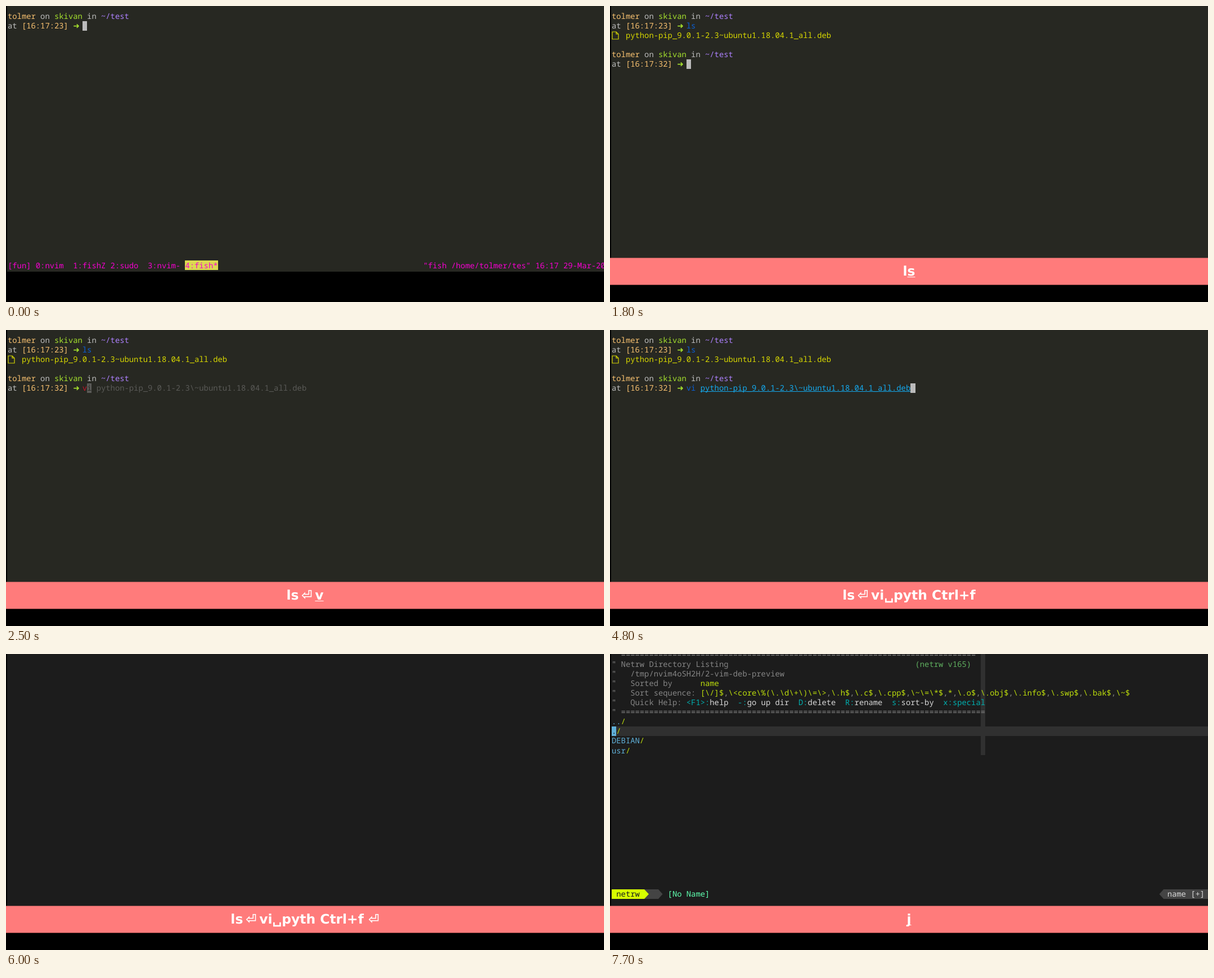
An HTML page with a canvas that plays this animation: 1063x527 px, repeating every 8000 ms.

```html
<!DOCTYPE html>
<html lang="en">
<head>
<meta charset="utf-8">
<title>Terminal session</title>
<style>
html, body { margin: 0; width: 100%; height: 100%; overflow: hidden; background: #000; }
canvas { display: block; }
</style>
</head>
<body>
<canvas id="stage" width="1063" height="527"></canvas>
<script>
const ctx = document.getElementById('stage').getContext('2d');
const W = 1063, LOOP = 8000;
const LEFT = 3, TOP = 9.7, CW = 8.3, CH = 17.06;
const MONO = "500 13.83px 'Noto Sans Mono', 'DejaVu Sans', monospace";
const BOLD = "bold 23.4px 'DejaVu Sans', sans-serif";
const USER = 'tolmer', HOST = 'skivan';
const FILE = 'python-pip_9.0.1-2.3~ubuntu1.18.04.1_all.deb';
const PATH = FILE.replace('~', '\\~');

const GREY = '#bdbdbd', ORANGE = '#f8c170', LIME = '#a6e22e', PURPLE = '#ae81ff',
  BLUE = '#0a5fd7', CYAN = '#14a9ee', YELLOW = '#d7d700', HINT = '#5a5a57',
  RED = '#c4152c', PINK = '#f500d0', SHELL = '#272822',
  EDITOR = '#1c1c1c', STRIPE = '#303030', DIM = '#858585', GREEN = '#5faf5f',
  ACID = '#bcdc0c', TEAL = '#00afaf', WHITE = '#d8d8d8', DIR = '#5fafd7';

const colX = c => LEFT + c * CW;
const rowY = r => TOP + r * CH;

function rect(x, y, w, h, color) {
  ctx.fillStyle = color;
  ctx.fillRect(x, y, w, h);
}

function cells(col, row, n, color) {
  const x = Math.round(colX(col)), y = Math.round(rowY(row));
  rect(x, y, Math.round(colX(col + n)) - x, Math.round(rowY(row + 1)) - y, color);
}

function shape(color, ...p) {
  ctx.fillStyle = color;
  ctx.beginPath();
  for (let i = 0; i < p.length; i += 2) ctx.lineTo(p[i], p[i + 1]);
  ctx.fill();
}

// Writes colour/text pairs on the character grid, returns the next column.
function put(col, row, ...runs) {
  ctx.font = MONO;
  for (let i = 0; i < runs.length; i += 2) {
    ctx.fillStyle = runs[i];
    for (const ch of runs[i + 1]) {
      if (ch !== ' ') ctx.fillText(ch, colX(col), rowY(row) + 13.3);
      col++;
    }
  }
  return col;
}

function cursor(col, row, under = '') {
  cells(col, row, 1, under ? HINT : '#bbbbbb');
  put(col, row, SHELL, under);
}

function prompt(row, clock) {
  put(0, row, ORANGE, USER, GREY, ' on ', LIME, HOST, GREY, ' in ', PURPLE, '~/test');
  put(0, row + 1, GREY, 'at ', ORANGE, `[${clock}]`, LIME, ' ➜');
}

function fileIcon(x, y) {
  ctx.strokeStyle = YELLOW;
  ctx.lineWidth = 1.2;
  ctx.stroke(new Path2D(`M${x} ${y}h7l4 4v9h-11zM${x + 7} ${y}v4h4`));
}

function command(t) {
  if (t < 2500) return cursor(16, 5);
  if (t < 3700) {
    put(16, 5, RED, 'v', HINT, 'i ' + PATH);
    return cursor(17, 5, 'i');
  }
  const typed = t < 4800 ? 2 : PATH.length;
  put(16, 5, BLUE, 'vi ', CYAN, PATH.slice(0, typed), HINT, PATH.slice(typed));
  rect(colX(19), 109, typed * CW, 1, CYAN);
  cursor(19 + typed, 5, PATH[typed]);
}

function tmuxBar() {
  cells(38, 26, 7, '#dcda50');
  put(0, 26, PINK, '[fun] 0:nvim  1:fishZ 2:sudo  3:nvim- 4:fish*');
  put(89, 26, PINK, `"fish /home/${USER}/tes" 16:17 29-Mar-20`);
}

function shell(t) {
  rect(2, 0, W, 473, SHELL);
  prompt(0, '16:17:23');
  tmuxBar();
  if (t < 1200) return cursor(16, 1);
  put(16, 1, BLUE, t < 1400 ? 'l' : 'ls');
  if (t < 1400) return cursor(17, 1, 's');
  if (t < 1600) return cursor(18, 1);
  if (t < 1700) return cursor(0, 2);
  fileIcon(4, 46);
  put(3, 2, YELLOW, FILE);
  if (t < 1800) return cursor(0, 3);
  prompt(4, '16:17:32');
  command(t);
}

function listing(t) {
  const line = t < 7700 ? 6 : 7;
  rect(659, 0, 8, 180, STRIPE);
  cells(0, line, 130, STRIPE);
  put(0, -1, DIM, '" ' + '='.repeat(76));
  put(0, 0, DIM, '" Netrw Directory Listing');
  put(65, 0, GREEN, '(netrw v165)');
  put(0, 1, DIM, '"   /tmp/nvim4oSH2H/2-vim-deb-preview');
  put(0, 2, DIM, '"   Sorted by      ', ACID, 'name');
  let col = put(0, 3, DIM, '"   Sort sequence: ');
  const order = String.raw`[\/]$,\<core\%(\.\d\+\)\=\>,\.h$,\.c$,\.cpp$,\~\=\*$,*,\.o$,\.obj$,\.info$,\.swp$,\.bak$,\~$`;
  for (const ch of order) col = put(col, 3, ch === ',' ? DIM : ACID, ch);
  put(0, 4, DIM, '"   Quick Help: ', TEAL, '<F1>:', WHITE, 'help  ', TEAL, '-:', WHITE, 'go up dir  ',
    TEAL, 'D:', WHITE, 'delete  ', TEAL, 'R:', WHITE, 'rename  ', TEAL, 's:', WHITE, 'sort-by  ',
    TEAL, 'x:special');
  put(0, 5, DIM, '" ' + '='.repeat(78));
  ['..', '.', 'DEBIAN', 'usr'].forEach((name, i) => put(0, 6 + i, DIR, name, ACID, '/'));
  cells(0, line, 1, DIR);
  put(0, line, EDITOR, '.');
}

function statusLine() {
  const a = 419, m = 427.5, b = 436, tag = '#d7ff00', gray = '#444444';
  shape(gray, 61, a, 86, a, 93.5, m, 86, b, 61, b);
  shape(tag, LEFT, a, 61, a, 69, m, 61, b, LEFT, b);
  shape(gray, W, a, 984, a, 976.5, m, 984, b, W, b);
  put(1, 24, '#1c1c1c', 'netrw');
  put(12, 24, '#5fffaf', '[No Name]');
  put(119, 24, WHITE, 'name [+]');
}

function editor(t) {
  rect(2, 0, W, 473, EDITOR);
  if (t < 7000) return;
  listing(t);
  statusLine();
}

// Pressed keys, the last one underlined while it is a plain letter.
const KEYS = [[1200, 'l'], [1500, 'ls'], [1900, 'ls\u2009⏎'], [2500, 'ls\u2009⏎\u2009v'],
  [3700, 'ls\u2009⏎\u2009vi␣py'], [4800, 'ls\u2009⏎\u2009vi␣pyth Ctrl+f'],
  [6000, 'ls\u2009⏎\u2009vi␣pyth Ctrl+f ⏎'], [7700, 'j']];

function banner(t) {
  const text = KEYS.filter(k => k[0] <= t).pop()?.[1];
  if (!text) return;
  rect(0, 448.5, W, 48, '#ff7b7b');
  ctx.font = BOLD;
  ctx.fillStyle = '#fff';
  const w = ctx.measureText(text).width, x = (W - w) / 2, last = text.at(-1);
  ctx.fillText(text, x, 480);
  if (last !== '⏎' && !text.endsWith('+f')) {
    const lw = ctx.measureText(last).width;
    rect(x + w - lw, 482, lw, 1, '#fff');
  }
}

function draw(now) {
  const t = now % LOOP;
  ctx.textRendering = 'geometricPrecision';
  rect(0, 0, W, 527, '#000');
  (t < 6000 ? shell : editor)(t);
  banner(t);
  requestAnimationFrame(draw);
}
requestAnimationFrame(draw);
</script>
</body>
</html>
```
